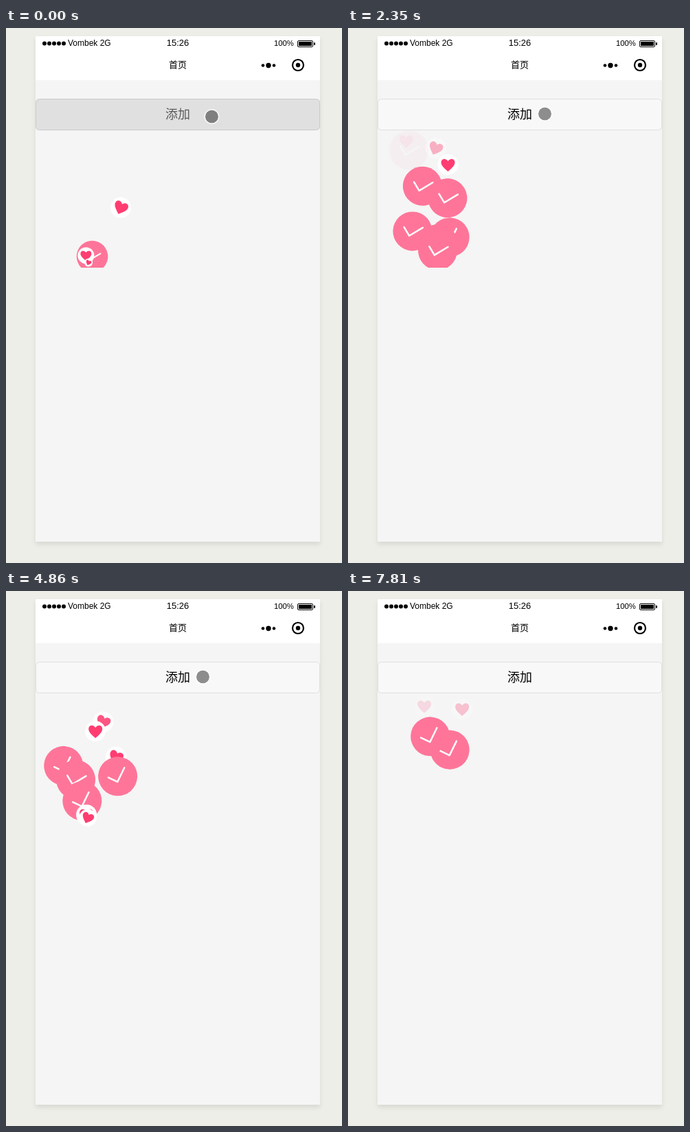
These frames come from a looping animation (489x779 px, 7910 ms). An HTML page:

```html
<!DOCTYPE html>
<html lang="zh">
<head>
<meta charset="utf-8">
<title>Floating likes</title>
<style>
  html, body { margin: 0; width: 100%; height: 100%; overflow: hidden; background: #eeeee9; }
  svg { display: block; }
  text { font-family: "Liberation Sans", "Noto Sans CJK SC", "Noto Sans CJK", sans-serif; fill: #000; }
  .mid { text-anchor: middle; }
  .phone { filter: drop-shadow(0 4px 3px rgba(0, 0, 0, .09)); }
  #button rect { fill: #f8f8f8; stroke: #dfdfdf; }
  #button.down rect { fill: #e0e0e0; stroke: #cacaca; }
  #button.down text { fill-opacity: .6; }
</style>
</head>
<body>
<svg width="489" height="779" viewBox="0 0 489 779">
  <defs>
    <clipPath id="area"><rect x="43" y="149" width="200" height="200"/></clipPath>
    <g id="tick">
      <circle r="28.5" fill="#ff7599"/>
      <path d="M-7.5 -11.5V3.2H15.5" fill="none" stroke="#fff" stroke-width="2.5" stroke-linecap="round" stroke-linejoin="round"/>
    </g>
    <g id="heart">
      <circle r="15" fill="#fff"/>
      <path d="M0 10C-3 7-10 2-10-3C-10-10-2-9.5 0-5C2-9.5 10-10 10-3C10 2 3 7 0 10Z" fill="#ff3d71"/>
    </g>
  </defs>

  <rect class="phone" x="43" y="12" width="414" height="736" fill="#f5f5f5"/>
  <rect x="43" y="12" width="414" height="64" fill="#fff"/>

  <g id="signal"></g>
  <text x="90" y="26" font-size="12">Vombek 2G</text>
  <text class="mid" x="250" y="26" font-size="13">15:26</text>
  <text x="390" y="26" font-size="11.3">100%</text>
  <rect x="424.5" y="18.5" width="22" height="9" rx="1.5" fill="none" stroke="#000"/>
  <rect x="426" y="20" width="19" height="6"/>
  <rect x="448" y="21" width="2" height="4" rx="1"/>

  <text class="mid" x="250" y="58" font-size="13">首页</text>
  <circle cx="374" cy="54.5" r="2.3"/>
  <circle cx="382" cy="54.5" r="3.7"/>
  <circle cx="390" cy="54.5" r="2.3"/>
  <circle cx="425" cy="54" r="8" fill="none" stroke="#000" stroke-width="2.2"/>
  <circle cx="425" cy="54" r="3.2"/>

  <g id="button">
    <rect x="43.5" y="103.5" width="413" height="45" rx="5"/>
    <text class="mid" x="250" y="132" font-size="18">添加</text>
  </g>
  <g clip-path="url(#area)"><g id="floats"></g></g>
  <g id="cursor">
    <circle r="9.6" fill="#000" fill-opacity=".43"/>
    <circle r="10.3" fill="none" stroke="#fff" stroke-opacity=".7" stroke-width="1.6"/>
  </g>
</svg>
<script>
// All times below are counted in picture steps.
const LOOP = 7910, STEP = 147.36, SLACK = 18;
const TOP = 148, FADE = 32, GROW = 2.5;
const START = { x: 126, y: 352 }, RISE = 203;

const KINDS = {
  tick:  { shape: "tick", r: 28.5, life: 21, turn: -31 },
  steep: { shape: "tick", r: 28.5, life: 21, turn: -64 },
  heart: { shape: "heart", r: 15, life: 19.5, turn: 0 },
  tilted: { shape: "heart", r: 15, life: 19.5, turn: 22 },
};

// kind, birth, x of the bend, x at the top
const TAPS = [
  ["tilted", -8.7, 197, 156],
  ["tick", -2, 126, 75],
  ["heart", -2, 76, 86],
  ["tilted", -1, 65, 146],
  ["heart", 1.3, 223, 97],
  ["tick", 3.4, 60, 165],
  ["tick", 5.2, 122, 205],
  ["tick", 10.2, 33, 193],
  ["steep", 11.1, 199, 53],
  ["tick", 12.1, 142, 146],
  ["tick", 13.1, 142, 165],
  ["tilted", 17.5, 218, 103],
  ["heart", 18.8, 8, 222],
  ["tilted", 22.4, 259, 18],
  ["steep", 22.9, 84, 34],
  ["steep", 24.5, 200, 132],
  ["tick", 25, 68, 146],
  ["steep", 28.2, 76, 173],
  ["heart", 30.5, 85, 142],
  ["tilted", 30.9, 84, 220],
  ["tilted", 34.7, -1, 208],
  ["heart", 35.3, 22, 129],
  ["heart", 35.7, 189, 161],
  ["steep", 38.5, 51, 180],
  ["steep", 40.5, 161, 141],
];

const $ = id => document.getElementById(id);
const clamp = v => Math.max(0, Math.min(1, v));
const ramp = (t, from, to) => clamp((t - from) / (to - from));
const mix = (a, b, u) => a + (b - a) * u;
const show = (el, on) => { el.style.display = on ? "" : "none"; };

function add(parent, tag, attrs) {
  const el = document.createElementNS("http://www.w3.org/2000/svg", tag);
  for (const k in attrs) el.setAttribute(k, attrs[k]);
  return parent.appendChild(el);
}

for (let i = 0; i < 5; i++) add($("signal"), "circle", { cx: 56 + 7 * i, cy: 22.5, r: 3 });

const floats = TAPS.map(([kind, born, bend, end]) => ({
  ...KINDS[kind], born, bend, end,
  el: add($("floats"), "use", { href: "#" + KINDS[kind].shape }),
}));

// Steady rise, swaying sideways on a quadratic curve.
function drawFloat({ r, life, turn, born, bend, end, el }, t) {
  const u = (t - born) / life;
  const x = mix(mix(START.x, bend, u), mix(bend, end, u), u);
  const y = START.y - RISE * u;
  const size = clamp((t - born) / GROW);
  const alpha = size && clamp((y - r - TOP) / FADE);
  show(el, alpha > 0);
  el.setAttribute("opacity", alpha);
  el.setAttribute("transform", `translate(${x} ${y}) rotate(${turn}) scale(${size})`);
}

function drawCursor(t) {
  const drift = ramp(t, 10, 13), leave = ramp(t, 39, 40);
  const x = mix(mix(299.5, 286.5, drift), 483, leave);
  const y = mix(mix(129, 125, drift), 773, leave);
  $("cursor").setAttribute("transform", `translate(${x} ${y})`);
  show($("cursor"), t <= 40);
}

function draw(t) {
  floats.forEach(f => drawFloat(f, t));
  drawCursor(t);
  $("button").classList.toggle("down", floats.some(({ born }) => t >= born - 1.3 && t <= born - .6));
}

const start = performance.now();
function frame() {
  const t = (performance.now() - start) % LOOP;
  draw(Math.floor((t + SLACK) / STEP));
  requestAnimationFrame(frame);
}
frame();
</script>
</body>
</html>
```
